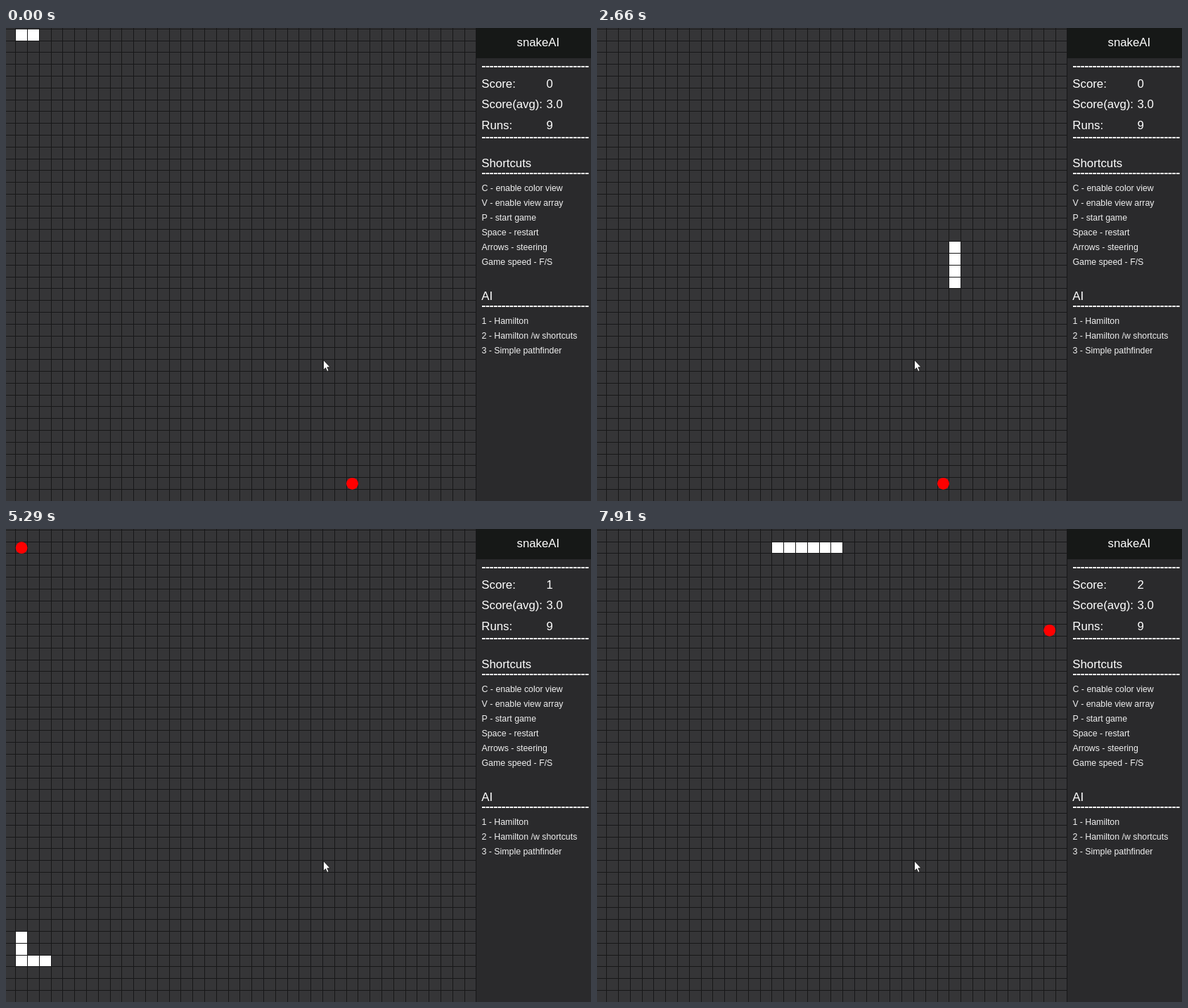
These frames come from a looping animation (832x673 px, 7990 ms). An HTML page with a canvas:

```html
<!DOCTYPE html>
<html lang="en">
<head>
<meta charset="utf-8">
<title>snakeAI</title>
<style>
html, body { margin: 0; width: 100%; height: 100%; overflow: hidden; background: #353537; }
canvas { display: block; }
</style>
</head>
<body>
<canvas id="stage" width="832" height="673"></canvas>
<script>
const ctx = document.getElementById('stage').getContext('2d');
const LOOP = 7990;
const PITCH = 16.8;
const FONT = '"Liberation Sans", Arial, sans-serif';

// Screen updates come in bursts of [first, last] ms, eleven updates each.
const BURSTS = [
  [60, 820], [900, 1670], [1740, 2510], [2590, 3360], [3430, 4200],
  [4280, 5050], [5120, 5900], [5980, 6740], [6820, 7600], [7680, 7910]
];
const TICKS = BURSTS.flatMap(([first, last], b) => {
  const gaps = b === BURSTS.length - 1 ? 3 : 10;
  return Array.from({ length: gaps + 1 },
    (_, i) => Math.round((first + (last - first) * i / gaps) / 10) * 10);
});

// Cells travelled after a number of updates: [updates, cells].
const PACE = [
  [0, 0], [11, 16], [22, 32], [27, 39], [33, 48], [44, 63], [55, 80],
  [57, 83], [66, 95], [77, 111], [82, 118], [88, 128], [99, 145], [103, 151]
];

// Corners of the head's route as [column, row].
const ROUTE = [[1, 0], [29, 0], [29, 38], [2, 38], [2, 36], [0, 36], [0, 1], [25, 1]];

// Each apple lasts until the head has travelled that many cells.
const APPLES = [
  { col: 28, row: 38, until: 67 },
  { col: 0, row: 1, until: 132 },
  { col: 37, row: 8, until: Infinity }
];

const lineX = c => Math.floor(13.6 + PITCH * c);
const lineY = r => Math.floor(1.3 + PITCH * r);

const path = [ROUTE[0]];
for (let i = 1; i < ROUTE.length; i++) {
  let [c, r] = ROUTE[i - 1];
  const [endC, endR] = ROUTE[i];
  while (c !== endC || r !== endR) {
    c += Math.sign(endC - c);
    r += Math.sign(endR - r);
    path.push([c, r]);
  }
}

function travelled(time) {
  const n = TICKS.filter(t => t <= time).length;
  const i = PACE.findIndex(([updates]) => updates >= n);
  if (i === 0) return 0;
  const [n0, m0] = PACE[i - 1];
  const [n1, m1] = PACE[i];
  return Math.floor(m0 + (m1 - m0) * (n - n0) / (n1 - n0) + 1e-6);
}

function drawSnake(moved, length) {
  ctx.fillStyle = '#fff';
  for (let i = 0; i < length; i++) {
    const [c, r] = moved - i < 0 ? [0, 0] : path[moved - i];
    const x = lineX(c) + 1, y = lineY(r) + 1;
    ctx.fillRect(x, y, lineX(c + 1) - x, lineY(r + 1) - y);
  }
}

function drawApple({ col, row }) {
  ctx.fillStyle = '#f00';
  ctx.beginPath();
  ctx.arc(22.1 + PITCH * col, 9.9 + PITCH * row, 8.4, 0, Math.PI * 2);
  ctx.fill();
}

function drawGrid() {
  ctx.fillStyle = '#353537';
  ctx.fillRect(0, 0, 669, 673);
  ctx.fillStyle = '#171718';
  for (let c = 0; c < 40; c++) ctx.fillRect(lineX(c), 0, 1, 673);
  for (let r = 0; r < 41; r++) ctx.fillRect(0, lineY(r), 669, 1);
}

function text(str, x, y, size = 16.8) {
  ctx.font = `${size}px ${FONT}`;
  ctx.fillText(str, x, y);
}

function drawPanel(score) {
  ctx.fillStyle = '#2a2a2c';
  ctx.fillRect(669, 0, 163, 673);
  ctx.fillStyle = '#161817';
  ctx.fillRect(669, 0, 163, 43);

  ctx.strokeStyle = '#fff';
  ctx.lineWidth = 2;
  ctx.setLineDash([4.65, 1]);
  ctx.beginPath();
  for (const y of [55, 156, 207, 396]) {
    ctx.moveTo(677, y);
    ctx.lineTo(829, y);
  }
  ctx.stroke();
  ctx.setLineDash([]);

  ctx.fillStyle = '#fff';
  text('snakeAI', 726.5, 26);
  [['Score:', score], ['Score(avg):', '3.0'], ['Runs:', 9]].forEach(([label, value], i) => {
    const y = Math.round(85 + i * 29.4);
    text(label, 676.3, y);
    text(value, 768.5, y);
  });
  text('Shortcuts', 676.3, 198);
  text('AI', 676.3, 387);

  ctx.fillStyle = '#f0f0f0';
  const list = (items, top) => items.forEach((item, i) => text(item, 676.5, top + i * 21, 12.35));
  list(['C - enable color view', 'V - enable view array', 'P - start game',
    'Space - restart', 'Arrows - steering', 'Game speed - F/S'], 232);
  list(['1 - Hamilton', '2 - Hamilton /w shortcuts', '3 - Simple pathfinder'], 421);
}

const pointer = new Path2D('M451.5 472.5V486.5L454.5 483.5L456.8 488.5L459 487.5L456.8 482.7H461Z');

function drawPointer() {
  ctx.fillStyle = '#fff';
  ctx.fill(pointer);
  ctx.strokeStyle = '#161616';
  ctx.lineWidth = 0.8;
  ctx.stroke(pointer);
}

function draw(time) {
  const moved = travelled(time);
  const score = APPLES.findIndex(a => moved < a.until);
  drawGrid();
  drawApple(APPLES[score]);
  drawSnake(moved, 4 + score);
  drawPanel(score);
  drawPointer();
}

const start = performance.now();
function frame() {
  draw((performance.now() - start) % LOOP);
  requestAnimationFrame(frame);
}
frame();
</script>
</body>
</html>
```
